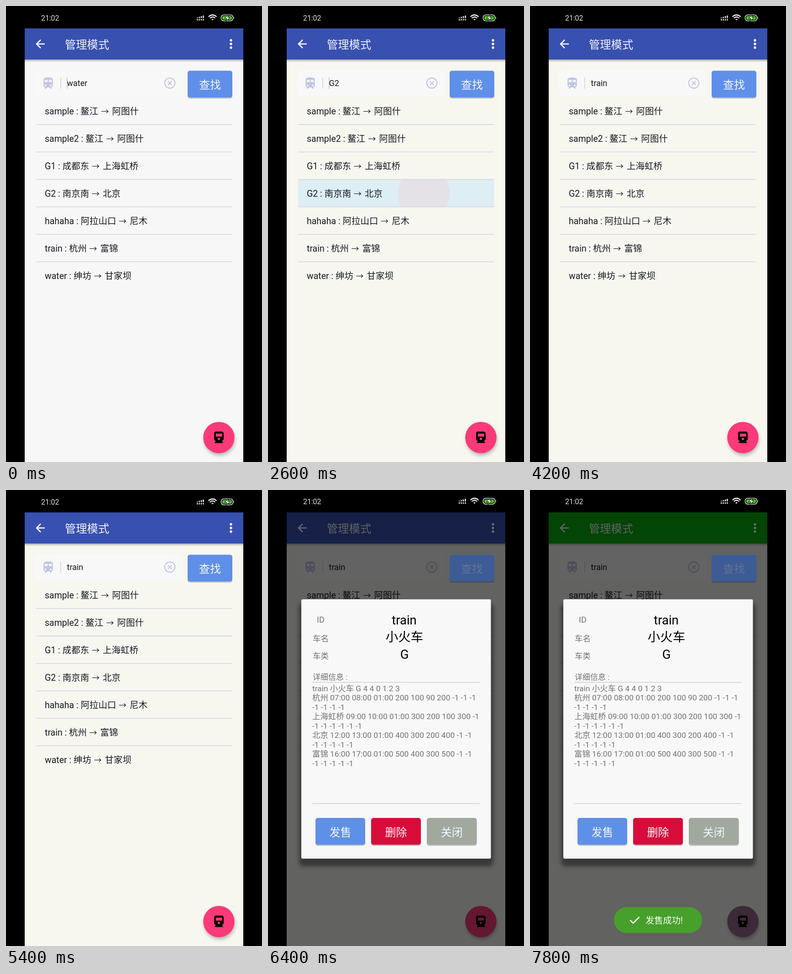
An HTML page for the animation above (8000 ms loop, 561 by 997 pixels).

```html
<!DOCTYPE html>
<html lang="zh-CN">
<head>
<meta charset="utf-8">
<style>
  html, body { margin: 0; width: 100%; height: 100%; overflow: hidden; background: #000; }
  svg { display: block; width: 100%; height: 100%; }
  text { font-family: Roboto, 'Noto Sans CJK SC', 'Noto Sans CJK', sans-serif; white-space: pre; }
  .arrow { font: 17px 'Noto Sans CJK SC', 'Noto Sans CJK', sans-serif; }
  .mid { text-anchor: middle; }
</style>
</head>
<body>
<svg viewBox="0 0 561 997">
  <defs>
    <filter id="blur" x="-20%" y="-20%" width="140%" height="140%"><feGaussianBlur stdDeviation="4"/></filter>
    <linearGradient id="fall" x2="0" y2="1">
      <stop stop-opacity=".28"/><stop offset="1" stop-opacity="0"/>
    </linearGradient>
    <clipPath id="rowClip"><rect id="clipRect" x="66" width="429.500" height="59"/></clipPath>
  </defs>
  <rect width="561" height="997"/>

  <g id="status" fill="#e4e4e4">
    <text x="77" y="32" font-size="15.800">21:02</text>
    <g id="signal"></g>
    <g fill="none" stroke="#f0f0f0" stroke-width="2.200">
      <path d="M443.500 23.500Q452.500 15.500 461.500 23.500M446.500 26.500Q452.500 21.500 458.500 26.500"/>
      <path d="M449.500 28.500h6l-3 3z" fill="#f0f0f0" stroke="none"/>
      <rect x="471.500" y="19.500" width="26" height="13" rx="5.500" stroke="#d8e8d4" stroke-width="1.600"/>
    </g>
    <rect x="474" y="22" width="21" height="8" rx="3" fill="#4cc42c"/>
    <path d="M499 23.500q2 2.500 0 5z"/>
    <path d="M487 19.500l-8 7.500h5l-2 6 9-8h-5z" fill="#fff" stroke="#000" stroke-width="1"/>
  </g>

  <rect id="page" x="41" y="49" width="479" height="948"/>
  <rect x="41" y="117" width="479" height="6" fill="url(#fall)"/>
  <rect id="bar" x="41" y="49" width="479" height="68"/>
  <path d="M85 83H67.500M76 74l-9 9 9 9" fill="none" stroke="#fff" stroke-width="2.500"/>
  <text x="129" y="93" font-size="24.300" fill="#f2f3fb">管理模式</text>
  <g fill="#fff"><circle cx="493" cy="75" r="2.700"/><circle cx="493" cy="83" r="2.700"/><circle cx="493" cy="91" r="2.700"/></g>

  <rect x="64" y="140" width="324" height="57" rx="8" fill="#f8f8f8"/>
  <path transform="translate(92.500 168.500) scale(1.280) translate(-12 -11.500)" fill="#c1c5e6" d="M12 2c-4 0-8 .5-8 4v9.500C4 17.430 5.570 19 7.500 19L6 20.500v.5h2.230l2-2H14l2 2h2v-.5L16.500 19c1.930 0 3.500-1.570 3.500-3.500V6c0-3.500-3.580-4-8-4zM7.500 17a1.500 1.500 0 1 1 0-3 1.500 1.500 0 1 1 0 3zM11 10H6V6h5zM13 10V6h5v4zM16.500 17a1.500 1.500 0 1 1 0-3 1.500 1.500 0 1 1 0 3z"/>
  <path d="M120 156v25" stroke="#d0d0d2" stroke-width="1.500"/>
  <path id="caret" d="M134 156v25" stroke="#a4a4a8"/>
  <text id="query" x="133.500" y="175" font-size="18" fill="#181818"></text>
  <g fill="none" stroke="#c3c6e4" stroke-width="2.200">
    <circle cx="359" cy="168.500" r="11.200"/><path d="M355 164.500l8 8m0-8l-8 8"/>
  </g>
  <g id="search"></g>

  <rect id="press" x="66" width="429.500" height="59" fill="#ddeef4"/>
  <circle id="ripple" clip-path="url(#rowClip)"/>
  <g id="list" font-size="19.500" fill="#161a20"></g>

  <circle cx="468" cy="949" r="33" opacity=".3" filter="url(#blur)"/>
  <circle id="fab" cx="466.500" cy="943.500" r="34.300"/>
  <path d="M461 930.500h11q5 0 5 5v10.500q0 4-4 5l2.500 3v1.500h-18V954l2.500-3q-4-1-4-5v-10.500q0-5 4-5z"/>
  <g id="fabHoles"><rect x="460" y="935" width="13.500" height="6.500"/><circle cx="466.500" cy="946.500" r="2.600"/></g>

  <g id="modal">
    <rect x="41" y="49" width="479" height="948" opacity=".6"/>
    <rect x="398" y="141" width="98" height="59" rx="5" fill="#5f8fe8" opacity=".4"/>
    <rect x="68" y="247" width="426" height="576" rx="10" opacity=".42" filter="url(#blur)"/>
    <rect x="73" y="239" width="415.500" height="567" rx="3" fill="#f8f8f8"/>
    <g fill="#727272" font-size="17.500">
      <text x="107" y="290" font-size="18">ID</text>
      <text x="98" y="331">车名</text>
      <text x="98" y="369">车类</text>
      <text x="98" y="415" font-size="17">详细信息 :</text>
    </g>
    <g class="mid" font-size="27.500">
      <text x="298.500" y="294">train</text>
      <text x="299" y="331">小火车</text>
      <text x="299" y="369">G</text>
    </g>
    <path d="M97 420.500H464" stroke="#e6c4c6" stroke-width="1.400"/>
    <path id="baseline" d="M97 685.500H464" stroke-width="1.500"/>
    <g id="details" font-size="17.400" fill="#70746f"></g>
    <g id="actions"></g>
  </g>

  <g id="toast">
    <rect x="184" y="912" width="193" height="56.500" rx="28" fill="#46a02b"/>
    <path d="M219.500 940.500l6.500 6.500 13.500-13.500" fill="none" stroke="#fff" stroke-width="2.600"/>
    <text x="253" y="948" font-size="19.300" fill="#f6fff2">发售成功!</text>
  </g>
</svg>
<script>
const $ = id => document.getElementById(id);
const set = (id, attrs) => { for (const k in attrs) $(id).setAttribute(k, attrs[k]); };
const clamp = v => Math.max(0, Math.min(1, v));

const button = (x, y, w, fill, label) => `
  <rect x="${x}" y="${y + 3}" width="${w}" height="58" rx="5" opacity=".22"/>
  <rect x="${x}" y="${y}" width="${w}" height="58.500" rx="5" fill="${fill}"/>
  <text class="mid" x="${x + w / 2}" y="${y + 39.500}" font-size="24" fill="#f6f8fc">${label}</text>`;

// name, departure, terminus, terminus x
const trains = [
  ['sample', '鳌江', '阿图什', 232.5], ['sample2', '鳌江', '阿图什', 243.5],
  ['G1', '成都东', '上海虹桥', 212], ['G2', '南京南', '北京', 212],
  ['hahaha', '阿拉山口', '尼木', 271], ['train', '杭州', '富锦', 206.5],
  ['water', '绅坊', '甘家坝', 216.5]
];
$('list').innerHTML = trains.map(([name, from, to, x], i) => {
  const y = 237 + 60 * i;
  const rule = i < 6 ? `<path d="M66 ${y + 22.3}H495.500" stroke="#d1d6de" stroke-width="1.600"/>` : '';
  return `<text x="85" y="${y}">${name} : ${from}</text>
    <text class="arrow" x="${x - 24}" y="${y}">→</text><text x="${x}" y="${y}">${to}</text>${rule}`;
}).join('');

$('details').innerHTML = [
  'train 小火车 G 4 4 0 1 2 3',
  '杭州 07:00 08:00 01:00 200 100 90 200 -1 -1 -1', '-1 -1 -1 -1',
  '上海虹桥 09:00 10:00 01:00 300 200 100 300 -1', '-1 -1 -1 -1 -1 -1',
  '北京 12:00 13:00 01:00 400 300 200 400 -1 -1', '-1 -1 -1 -1 -1',
  '富锦 16:00 17:00 01:00 500 400 300 500 -1 -1', '-1 -1 -1 -1 -1'
].map((s, i) => `<text x="97" y="${440 + 20.45 * i}">${s}</text>`).join('');

$('search').innerHTML = button(398, 141.5, 98, '#5f8fe8', '查找');
$('actions').innerHTML = button(104, 717, 109, '#5f90e8', '发售') +
  button(226, 717, 109, '#d80c3a', '删除') + button(348, 717, 109.5, '#a1a89e', '关闭');
$('signal').innerHTML = [0, 1, 2, 3].map(i =>
  `<rect x="${418 + 4.4 * i}" y="${25 - 1.4 * i}" width="2.600" height="${1.5 + 1.4 * i}"/>
   <rect x="${418 + 4.4 * i}" y="28.500" width="2.600" height="3"/>`).join('');

const taps = [
  { at: 2430, row: 3, x: 341.5, y: 410, fill: '#e5e1e7' },
  { at: 3564, row: 5, x: 308, y: 518.5, fill: '#d8deea' }
];
const caretOff = [[400, 900], [1400, 1800], [3000, 3500], [4100, 4600], [5100, 8000]];
const LOOP = 8000, TICK = 200;

function draw(t) {
  const tap = taps.findLast(p => t >= p.at);
  const open = clamp((t - 5700) / 200);
  const sold = clamp((t - 7100) / 200);

  $('query').textContent = tap ? trains[tap.row][0] : 'water';
  set('caret', { opacity: caretOff.some(([a, b]) => t >= a && t < b) ? 0 : 1 });
  set('page', { fill: t < 1800 ? '#f7f7f7' : '#f7f7f0' });

  const age = tap ? t - tap.at : 9999;
  const fade = 1 - clamp((age - 380) / 250);
  set('press', { opacity: clamp(age / 160) * fade });
  set('ripple', { opacity: fade });
  if (tap) {
    const top = 199.5 + 60 * tap.row;
    set('press', { y: top });
    set('clipRect', { y: top });
    set('ripple', { cx: tap.x, cy: tap.y, r: age * 0.335, fill: tap.fill });
  }

  const fabFill = sold > 0 ? '#966a8c' : '#fb3a79';
  set('fab', { fill: fabFill });
  set('fabHoles', { fill: fabFill });
  set('bar', { fill: sold > 0 ? '#06ac0c' : '#3850b0' });
  set('status', { transform: `translate(0 ${open > 0 ? -1.5 : 0})` });
  set('modal', { opacity: open });
  set('baseline', { stroke: sold > 0 ? '#d2cecb' : '#b9cfdf' });
  set('toast', { opacity: sold });
}

const start = performance.now();
function loop(now) {
  const t = Math.max(0, now - start) % LOOP;
  draw(Math.floor(t / TICK) * TICK);
  requestAnimationFrame(loop);
}
draw(0);
requestAnimationFrame(loop);
</script>
</body>
</html>
```
